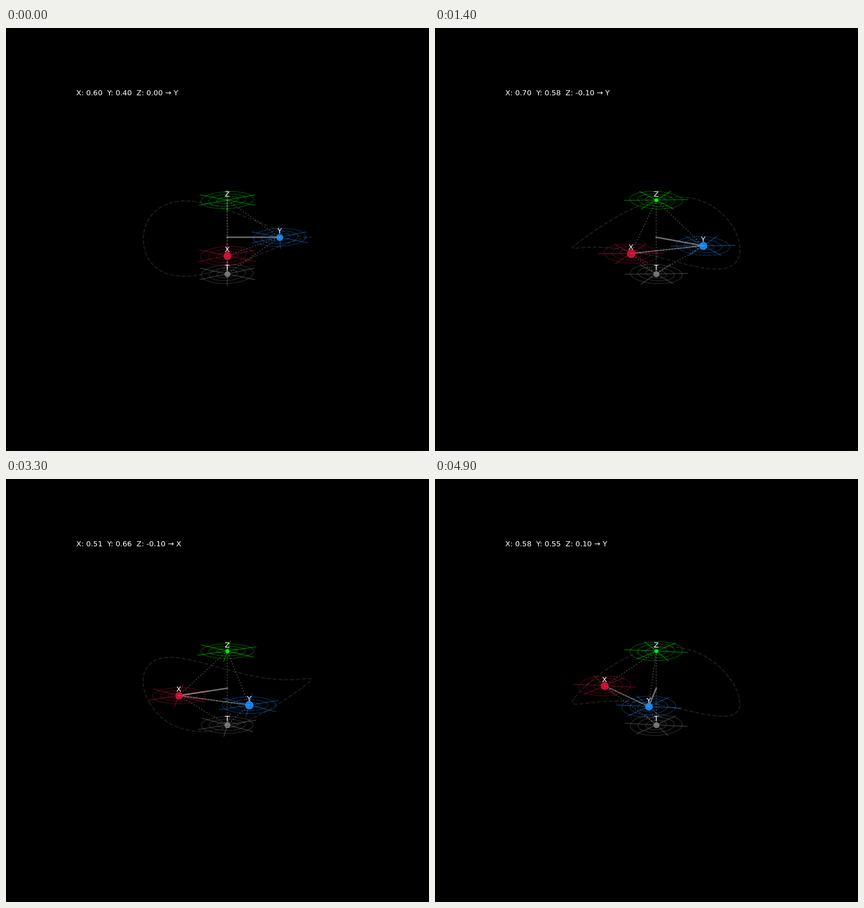
Recreate the animation shown at these times as an HTML page with a canvas. Size 748 by 748 pixels, loop 5 s.

```html
<!DOCTYPE html>
<html lang="en">
<head>
<meta charset="utf-8">
<title>Rotating nodes</title>
<style>
  html, body { margin: 0; width: 100%; height: 100%; overflow: hidden; background: #000; }
  canvas { display: block; }
</style>
</head>
<body>
<canvas id="stage" width="748" height="748"></canvas>
<script>
const ctx = document.getElementById('stage').getContext('2d');
const TAU = 2 * Math.PI, DEG = Math.PI / 180;
const PT = 1.2986;                    // pixels per point
const ELEV = 20 * DEG, DIST = 10;
const UNIT = 0.29762, UNIT_Z = 0.22321;

const nodes = {
  X: { at: [1, 0, 0], rgb: '220,20,60' },
  Y: { at: [0, 1, 0], rgb: '30,144,255' },
  Z: { at: [0, 0, 1], rgb: '0,255,0' },
  T: { at: [0, 0, -1], rgb: '128,128,128' }
};
const edges = ['XY', 'XZ', 'XT', 'YZ', 'YT', 'ZT'];

// step, X, Y, Z
const states = [
  [0, .60, .40, 0], [9, .90, .67, .1], [18, .54, .50, -.1], [25, .61, .53, .1],
  [33, .51, .66, -.1], [43, .57, .54, .1], [49, .58, .55, .1]
];

let azim = 0;

function project([x, y, z]) {
  x *= UNIT; y *= UNIT; z *= UNIT_Z;
  const side = y * Math.cos(azim) - x * Math.sin(azim);
  const front = x * Math.cos(azim) + y * Math.sin(azim);
  const up = z * Math.cos(ELEV) - front * Math.sin(ELEV);
  const depth = DIST - front * Math.cos(ELEV) - z * Math.sin(ELEV);
  return [391.2 + 3113.4 * side / depth, 370 - 3113.4 * up / depth];
}

const polar = ([x, y, z], r, a, lift = 0) =>
  [x + r * Math.cos(a), y + r * Math.sin(a), z + lift];

function line(points, color, weight, dash = []) {
  const w = weight * PT;
  ctx.beginPath();
  points.forEach(p => ctx.lineTo(...project(p)));
  ctx.strokeStyle = color;
  ctx.lineWidth = w;
  ctx.lineCap = dash.length ? 'butt' : 'square';
  ctx.lineJoin = 'round';
  ctx.setLineDash(dash.map(d => d * w));
  ctx.stroke();
}

function loop(count, point) {
  return Array.from({ length: count + 1 }, (_, k) => point(k / count * TAU));
}

// Rings wobble around the node, spokes stay flat.
function web({ at, rgb }, step) {
  for (const r of [.2, .35, .5])
    line(loop(60, a => polar(at, r, a, .03 * Math.sin(a + .2 * step))), `rgba(${rgb},.3)`, 1);
  for (let k = 0; k < 3; k++) {
    const a = k * 60 * DEG;
    line([polar(at, .6, a), polar(at, -.6, a)], `rgba(${rgb},.4)`, 1.2);
  }
}

function dot({ at, rgb }, size) {
  const [x, y] = project(at);
  ctx.beginPath();
  ctx.arc(x + .4, y + .4, Math.sqrt(size) / 2 * PT, 0, TAU);
  ctx.fillStyle = ctx.strokeStyle = `rgba(${rgb},.85)`;
  ctx.lineWidth = 1.5 * PT;
  ctx.setLineDash([]);
  ctx.fill();
  ctx.stroke();
}

function valuesAt(step) {
  const k = Math.max(1, states.findIndex(s => s[0] >= step));
  const a = states[k - 1], b = states[k];
  const f = (step - a[0]) / (b[0] - a[0]);
  const mix = n => a[n] + (b[n] - a[n]) * f;
  const z = step && (f < .5 && k > 1 ? a : b)[3];
  return { X: mix(1), Y: mix(2), Z: z, T: .3 };
}

function draw(step) {
  azim = 2 * step * DEG;
  const v = valuesAt(step);
  const pick = v.X < v.Y ? 'X' : 'Y';
  const { X, Y } = nodes;

  ctx.fillStyle = '#000';
  ctx.fillRect(0, 0, 748, 748);

  const wave = a => [1.6 * Math.cos(a), 1.6 * Math.sin(a), .4 * Math.sin(2 * a + .1 * step)];
  line(loop(200, wave), 'rgb(29,29,29)', 1.5, [3.7, 1.6]);

  Object.values(nodes).forEach(node => web(node, step));
  for (const [a, b] of edges)
    line([nodes[a].at, nodes[b].at], 'rgba(255,255,255,.25)', 1.5, [1, 1.65]);
  if (step > 3) line([X.at, Y.at], 'rgba(255,255,255,.32)', 1.5);
  line([[0, 0, 0], nodes[pick].at], 'rgba(255,255,255,.43)', 2);

  for (const name in nodes) dot(nodes[name], 150 * Math.abs(v[name]));

  ctx.fillStyle = '#fff';
  ctx.font = '13px "DejaVu Sans", sans-serif';
  ctx.textAlign = 'center';
  for (const name in nodes) {
    const [x, y, z] = nodes[name].at;
    ctx.fillText(name, ...project([x, y, z + .1]));
  }
  ctx.textAlign = 'left';
  const readout = ['X', 'Y', 'Z'].map(n => `${n}: ${v[n].toFixed(2)}`).join('  ');
  ctx.fillText(`${readout} → ${pick}`, 124.3, 118.6);
}

const start = performance.now();
function tick() {
  draw(Math.floor((performance.now() - start) / 100) % 50);
  requestAnimationFrame(tick);
}
tick();
</script>
</body>
</html>
```
